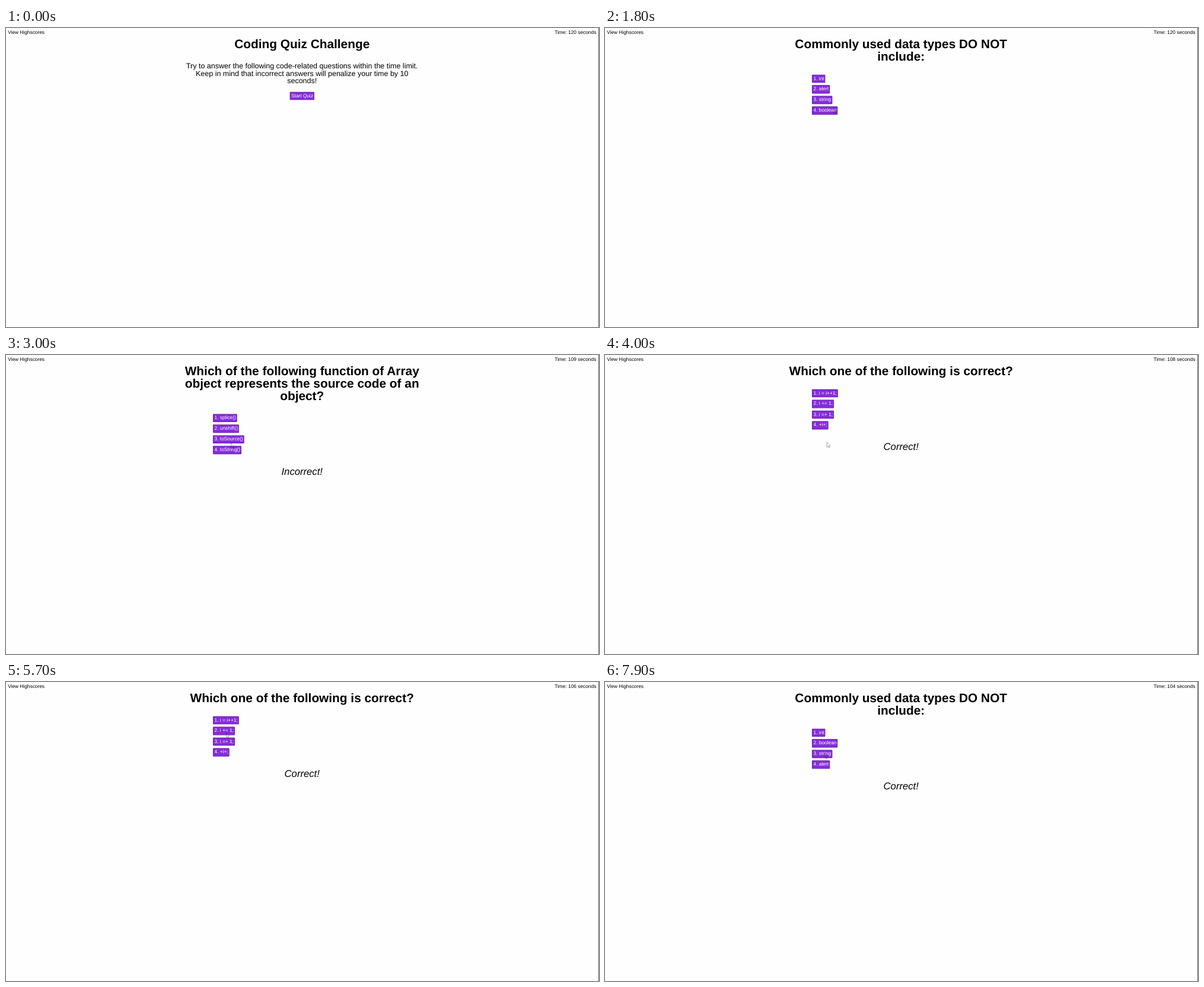
These frames come from a looping animation (1000x504 px, 8 s). An HTML page:

```html
<!DOCTYPE html>
<html lang="en">
<head>
<meta charset="utf-8">
<title>Coding Quiz</title>
<style>
html, body { margin: 0; width: 100%; height: 100%; overflow: hidden; background: #fefefe; }
#view { position: relative; width: 100%; height: 100%; overflow: hidden; contain: strict; }
#stage {
  position: absolute; left: 0; top: 0; width: 1920px; height: 967px;
  transform: scale(.5208333); transform-origin: 0 0;
  font: 16px/1 "Liberation Sans", Arial, sans-serif; color: #000;
  text-rendering: geometricPrecision; white-space: nowrap;
}
#stage div, #stage svg { position: absolute; }
#scores { left: 6px; top: 6.5px; }
#time { right: 9px; top: 6.5px; }
#edge { left: 1918px; top: 0; width: 2px; height: 968px; background: #666; }
#page { left: 0; top: 0; width: 1917px; text-align: center; }
#page > div { left: 0; width: 100%; }
.title { top: 32px; font-size: 40px; font-weight: bold; }
.intro { top: 111.5px; font-size: 24px; }
.note { font-size: 32px; font-style: italic; }
.button {
  display: inline-block; box-sizing: border-box; height: 26.4px; padding: 0 3.6px 0 5px;
  line-height: 26.4px; color: #fff; background: #862cd9; border-radius: 2px;
  box-shadow: inset 0 0 0 1.3px #4d2585;
}
#page > .option { left: 670px; width: auto; }
#cursor { left: 0; top: 0; overflow: visible; fill: none; stroke: #222; stroke-width: 1.2; opacity: .6; }
</style>
</head>
<body>
<div id="view">
  <div id="stage">
    <div id="scores">View Highscores</div>
    <div id="time"></div>
    <div id="page"></div>
    <div id="edge"></div>
    <svg id="cursor" width="14" height="20"><path d="M0 0V16L4 13L6.5 18.5L9 17.5L6.5 12H11.5Z"/></svg>
  </div>
</div>
<script>
const LOOP = 8000, STEP = 100, SCALE = 1.92;
const $ = id => document.getElementById(id);

const types = ["Commonly used data types DO NOT", "include:"];
const scenes = [
  { at: 0, title: ["Coding Quiz Challenge"] },
  { at: 1100, title: types, options: ["int", "alert", "string", "boolean"], note: "" },
  { at: 2500,
    title: ["Which of the following function of Array", "object represents the source code of an", "object?"],
    options: ["splice()", "unshift()", "toSource()", "toString()"], note: "Incorrect!" },
  { at: 4000, title: ["Which one of the following is correct?"],
    options: ["i = i++1;", "i += 1;", "i =+ 1;", "+i+;"], note: "Correct!" },
  { at: 7200, title: types, options: ["int", "boolean", "string", "alert"], note: "Correct!" }
];

// Pointer stops: time, x, y
const stops = [
  [100, 504, 301], [700, 498, 112], [1300, 498, 112], [1800, 385, 135],
  [2500, 383, 136], [3000, 379.5, 149], [3200, 377, 144], [3700, 374, 147],
  [4300, 374, 147], [5200, 371, 87], [5700, 371, 85], [7200, 371, 83], [7400, 371, 83],
  [7900, 370, 120]
];

const block = (kind, html, top) =>
  `<div class="${kind}"${top ? ` style="top:${top}px"` : ""}>${html}</div>`;
const button = label => `<span class="button">${label}</span>`;

function pageHtml({ title, options, note }) {
  const heading = block("title", title.join("<br>"));
  if (!options) {
    return heading + block("intro",
      "Try to answer the following code-related questions within the time limit.<br>" +
      "Keep in mind that incorrect answers will penalize your time by 10<br>seconds!") +
      block("start", button("Start Quiz"), 207);
  }
  const top = 71 + 40 * title.length;
  return heading +
    options.map((o, i) => block("option", button(`${i + 1}. ${o}`), top + 34.4 * i)).join("") +
    block("note", note, top + 169);
}

function secondsLeft(t) {
  const elapsed = Math.max(0, Math.floor((t - 1100) / 1000));
  return 120 - elapsed - (t >= 2500 ? 10 : 0);
}

function pointerAt(t) {
  const i = stops.findIndex(s => s[0] >= t);
  if (i <= 0) return stops[0].slice(1);
  const [t0, x0, y0] = stops[i - 1], [t1, x1, y1] = stops[i];
  const k = (t - t0) / (t1 - t0), e = k * k * (3 - 2 * k);
  return [x0 + (x1 - x0) * e, y0 + (y1 - y0) * e];
}

let shown;
function draw(now) {
  const t = Math.floor(now % LOOP / STEP) * STEP;
  const scene = scenes.filter(s => s.at <= t).pop();
  if (scene !== shown) $("page").innerHTML = pageHtml(shown = scene);
  $("time").textContent = `Time: ${secondsLeft(t)} seconds`;
  const [x, y] = pointerAt(t);
  $("cursor").style.display = t < STEP ? "none" : "";
  $("cursor").style.transform = `translate(${x * SCALE}px, ${y * SCALE}px)`;
}

const start = performance.now();
function tick() {
  draw(performance.now() - start);
  requestAnimationFrame(tick);
}
tick();
</script>
</body>
</html>
```
